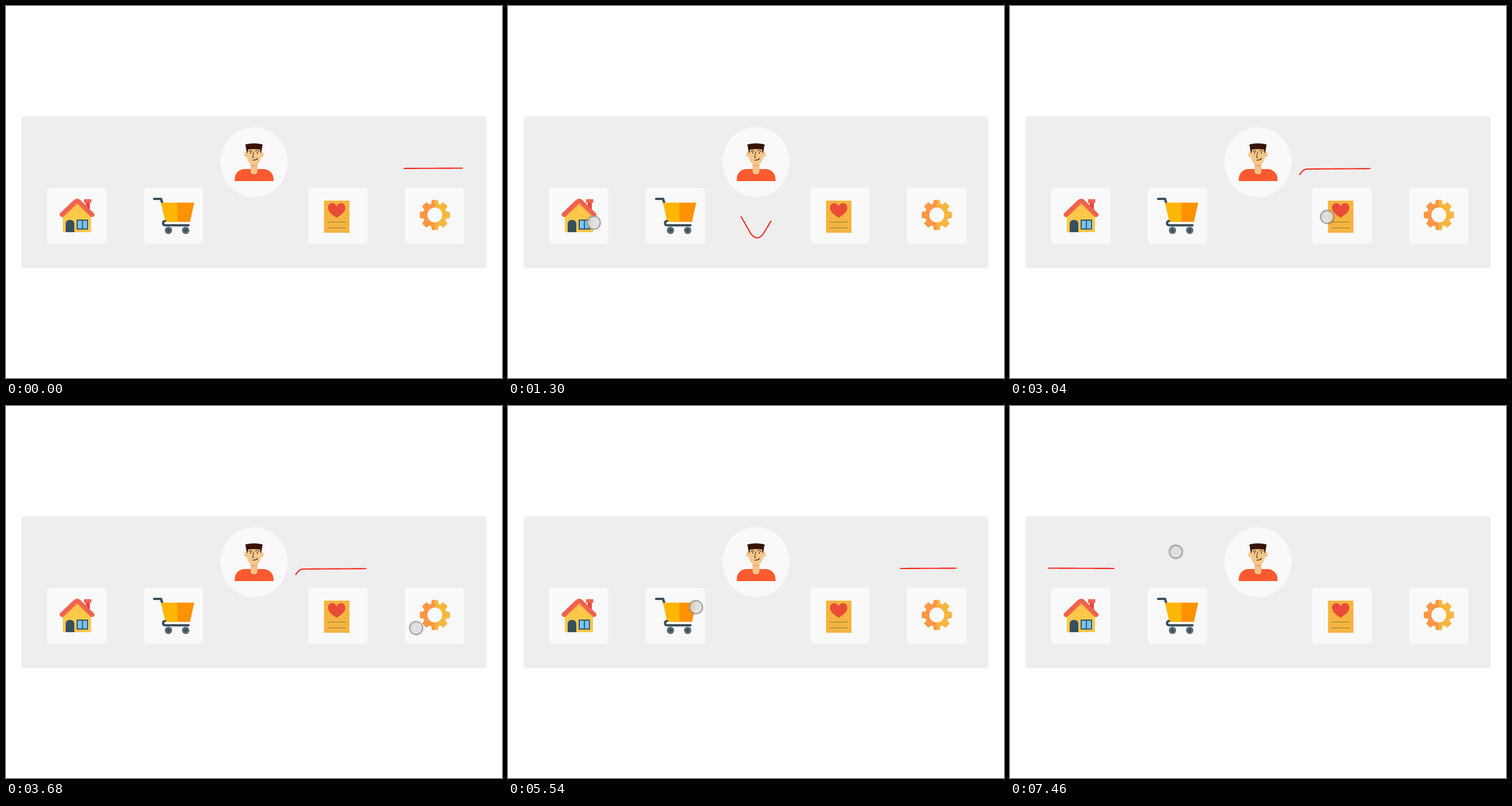
An HTML page with a canvas that plays this animation: 864x648 px, repeating every 7480 ms.

```html
<!DOCTYPE html>
<html lang="en">
<head>
<meta charset="utf-8">
<title>Menu</title>
<style>
  html, body { margin: 0; width: 100%; height: 100%; overflow: hidden; background: #fff; }
  canvas { display: block; }
</style>
</head>
<body>
<canvas id="stage" width="864" height="648"></canvas>
<script>
const LOOP = 7480;
const canvas = document.getElementById('stage');
const ctx = canvas.getContext('2d');

function bezier(x1, y1, x2, y2) {
  const curve = (a, b, p) => 3 * a * p * (1 - p) ** 2 + 3 * b * p * p * (1 - p) + p ** 3;
  return u => {
    if (u <= 0) return 0;
    if (u >= 1) return 1;
    let lo = 0, hi = 1;
    for (let i = 0; i < 24; i++) {
      const mid = (lo + hi) / 2;
      if (curve(x1, x2, mid) < u) lo = mid; else hi = mid;
    }
    return curve(y1, y2, lo);
  };
}
const ease = bezier(0.25, 0.1, 0.25, 1);
const quick = bezier(0.1, 0.35, 0.3, 1);
const inOut = bezier(0.42, 0, 0.58, 1);

// Drawing helpers
function fill(c, color, d) {
  c.fillStyle = color;
  c.fill(new Path2D(d));
}
function stroke(c, color, width, d) {
  c.strokeStyle = color;
  c.lineWidth = width;
  c.stroke(new Path2D(d));
}
function box(c, color, x, y, w, h, r = 0) {
  c.fillStyle = color;
  c.beginPath();
  c.roundRect(x, y, w, h, r);
  c.fill();
}
function oval(c, color, x, y, rx, ry = rx) {
  c.fillStyle = color;
  c.beginPath();
  c.ellipse(x, y, rx, ry, 0, 0, 2 * Math.PI);
  c.fill();
}

function drawHouse(c) {
  box(c, '#e2483d', 139, 342, 7, 18);
  box(c, '#f0624f', 136, 336.5, 12.5, 6.5, 0.5);
  fill(c, '#ffc84b', 'M99 394V363L123.5 341L148 363V394Z');
  stroke(c, '#f9b53f', 2, 'M99.5 367L123.5 346L148 367');
  stroke(c, '#f0624f', 8, 'M97.5 363.5L120.5 341.5Q124 338 127.5 341.5L150 363.5');
  fill(c, '#37505f', 'M104 394V380Q104 372.5 111.5 372.5Q119 372.5 119 380V394Z');
  box(c, '#37505f', 123, 372, 20, 17.5, 0.5);
  box(c, '#72c5f7', 125, 374, 7.2, 13.5);
  box(c, '#72c5f7', 134, 374, 7.2, 13.5);
}

function drawCart(c) {
  stroke(c, '#3b4f5c', 4.2, 'M258 336H270L272.5 344');
  fill(c, '#ffb605', 'M270 342.5H299V376H277.5Z');
  fill(c, '#ff9203', 'M298.5 342.5H328L320.5 376H298.5Z');
  stroke(c, '#3b4f5c', 4, 'M277 374.5Q273.5 375 273.5 378.2Q273.5 382 278 382H318');
  for (const x of [283, 313]) {
    oval(c, '#566973', x, 390.8, 6.4);
    oval(c, '#37474f', x, 390.8, 2.4);
  }
}

function drawNote(c) {
  box(c, '#f6b440', 554, 339, 44.3, 56);
  fill(c, '#e94b38', 'M576 369C569 364 561 359 561 351.5C561 342 572.5 341 576 349C579.5 341 591 342 591 351.5C591 359 583 364 576 369Z');
  box(c, '#8d7747', 560, 376, 32, 1);
  box(c, '#8d7747', 560, 386, 32, 1);
}

function drawGear(c) {
  const cx = 747, cy = 364;
  const gear = new Path2D();
  for (let k = 0; k < 8; k++) {
    const a = k * Math.PI / 4;
    for (const [r, d] of [[20.5, -0.32], [22.2, -0.27], [26.8, -0.2], [26.8, 0.2], [22.2, 0.27], [20.5, 0.32]])
      gear.lineTo(cx + r * Math.cos(a + d), cy + r * Math.sin(a + d));
  }
  gear.closePath();
  const blend = c.createLinearGradient(cx - 0.5, 0, cx + 0.5, 0);
  blend.addColorStop(0, '#ff9644');
  blend.addColorStop(1, '#f7b63e');
  c.fillStyle = blend;
  c.fill(gear);
  oval(c, '#f9f9f9', cx, cy, 13);
}

function drawPerson(c) {
  oval(c, '#f9f9f9', 432, 272, 58.5, 61);
  fill(c, '#ff5a30', 'M398.5 305V302C398.5 291 406 284 416 284H448C458 284 466 291 466 302V305Z');
  fill(c, '#f4c48a', 'M426 272H438V287Q438 293 432 293Q426 293 426 287Z');
  fill(c, '#f0a67c', 'M426 275H438V278Q432 281 426 278Z');
  oval(c, '#f5c78b', 418.6, 259, 3.4, 4.4);
  oval(c, '#f5c78b', 445.4, 259, 3.4, 4.4);
  fill(c, '#f5c78b', 'M420 248H444V262C444 271 438 277 432 277C426 277 420 271 420 262Z');
  fill(c, '#381404', 'M417 241Q432 237.5 447 241L444.5 256H443.5L442.5 250Q432 248.5 421.5 250L420.5 256H419.5Z');
  stroke(c, '#4a2814', 1.1, 'M423.5 253.5Q426 251.5 428.5 253M434.5 252.5Q438 250.5 441 253.5M431.5 254L429.5 264H431.8M429.5 268.5Q435 269 438.5 265.5');
  oval(c, '#381404', 426.2, 256, 1.1);
  oval(c, '#381404', 437.8, 256, 1.1);
}

// The still scene is painted once.
const scene = document.createElement('canvas');
scene.width = 864;
scene.height = 648;
(c => {
  c.lineCap = c.lineJoin = 'round';
  box(c, '#fff', 0, 0, 864, 648);
  box(c, '#eeeeee', 26.5, 192, 811, 264.5, 6);
  for (const x of [71.5, 240, 526.3, 694.8]) box(c, '#f9f9f9', x, 316.5, 103.5, 97.5, 6);
  drawHouse(c);
  drawCart(c);
  drawPerson(c);
  drawNote(c);
  drawGear(c);
})(scene.getContext('2d'));

// Track of the red marker, as quadratic pieces: control point, end point
const track = [[66, 282.5, 0]];
for (const [cx, cy, x, y] of [
  [207, 283, 348, 283.8], [358.5, 284, 365, 295.5], [394, 346, 423, 396.5],
  [434, 411, 445, 396.5], [475, 346, 503, 297.5], [509, 284, 518, 284], [657, 283, 796, 282.5]
]) {
  const [sx, sy] = track[track.length - 1];
  for (let i = 1; i <= 80; i++) {
    const p = i / 80, q = 1 - p;
    const px = q * q * sx + 2 * p * q * cx + p * p * x;
    const py = q * q * sy + 2 * p * q * cy + p * p * y;
    const [lx, ly, len] = track[track.length - 1];
    track.push([px, py, len + Math.hypot(px - lx, py - ly)]);
  }
}
const line = new Path2D();
track.forEach(([x, y]) => line.lineTo(x, y));

function lengthAt(x) {
  const i = track.findIndex(p => p[0] >= x);
  if (i < 1) return 0;
  const [ax, , al] = track[i - 1], [bx, , bl] = track[i];
  return al + (bl - al) * (x - ax) / (bx - ax);
}
const span = (a, b) => [lengthAt(a), lengthAt(b)];
const HOUSE = span(67, 181), CART = span(235, 364.8), NOTE = span(505, 627), GEAR = span(693.5, 795);

const selections = [
  [1150, HOUSE], [2740, NOTE], [4040, GEAR], [5510, CART], [6940, HOUSE]
];

function drawMarker(t) {
  let [from, to] = GEAR;
  let prev = GEAR;
  for (const [start, next] of selections) {
    if (t < start) break;
    const u = Math.min(1, (t - start) / 300), k = inOut(u);
    const squeeze = 0.014 * Math.abs(next[0] - prev[0]) * Math.sin(Math.PI * u);
    from = prev[0] + (next[0] - prev[0]) * k + squeeze;
    to = prev[1] + (next[1] - prev[1]) * k - squeeze;
    prev = next;
  }
  ctx.save();
  ctx.strokeStyle = '#f8291f';
  ctx.lineWidth = 2.1;
  ctx.lineCap = ctx.lineJoin = 'round';
  ctx.setLineDash([to - from, 2000]);
  ctx.lineDashOffset = -from;
  ctx.stroke(line);
  ctx.restore();
}

// Pointer moves: start, duration, end point, easing, vertical bow
const moves = [
  [280, 600, 149, 377, ease, 0],
  [1820, 640, 552, 367, quick, -4],
  [3300, 500, 720, 387, ease, 0],
  [4640, 440, 327, 350, ease, -20],
  [6186, 540, 141, 350, ease, 0],
  [7380, 460, 752, -50, ease, 0]
];

function pointerAt(t) {
  let x = 744, y = -16;
  for (const [start, time, ex, ey, easing, bow] of moves) {
    if (t < start) break;
    const k = easing((t - start) / time);
    x += (ex - x) * k;
    y += (ey - y) * k + 2 * k * (1 - k) * bow;
  }
  return [x, y];
}

function drawPointer(t) {
  if (t < 290) return;
  const [x, y] = pointerAt(t);
  oval(ctx, 'rgba(240,240,240,0.72)', x, y, 11);
  oval(ctx, 'rgba(212,212,212,0.6)', x, y, 9);
  ctx.save();
  ctx.shadowColor = 'rgba(0,0,0,0.35)';
  ctx.shadowBlur = 2;
  ctx.shadowOffsetX = ctx.shadowOffsetY = 1;
  ctx.strokeStyle = '#979797';
  ctx.lineWidth = 1.4;
  ctx.beginPath();
  ctx.arc(x, y, 11.2, 0, 2 * Math.PI);
  ctx.stroke();
  ctx.restore();
}

function frame() {
  const t = performance.now() % LOOP;
  ctx.drawImage(scene, 0, 0);
  drawMarker(t);
  drawPointer(t);
  requestAnimationFrame(frame);
}
frame();
</script>
</body>
</html>
```
